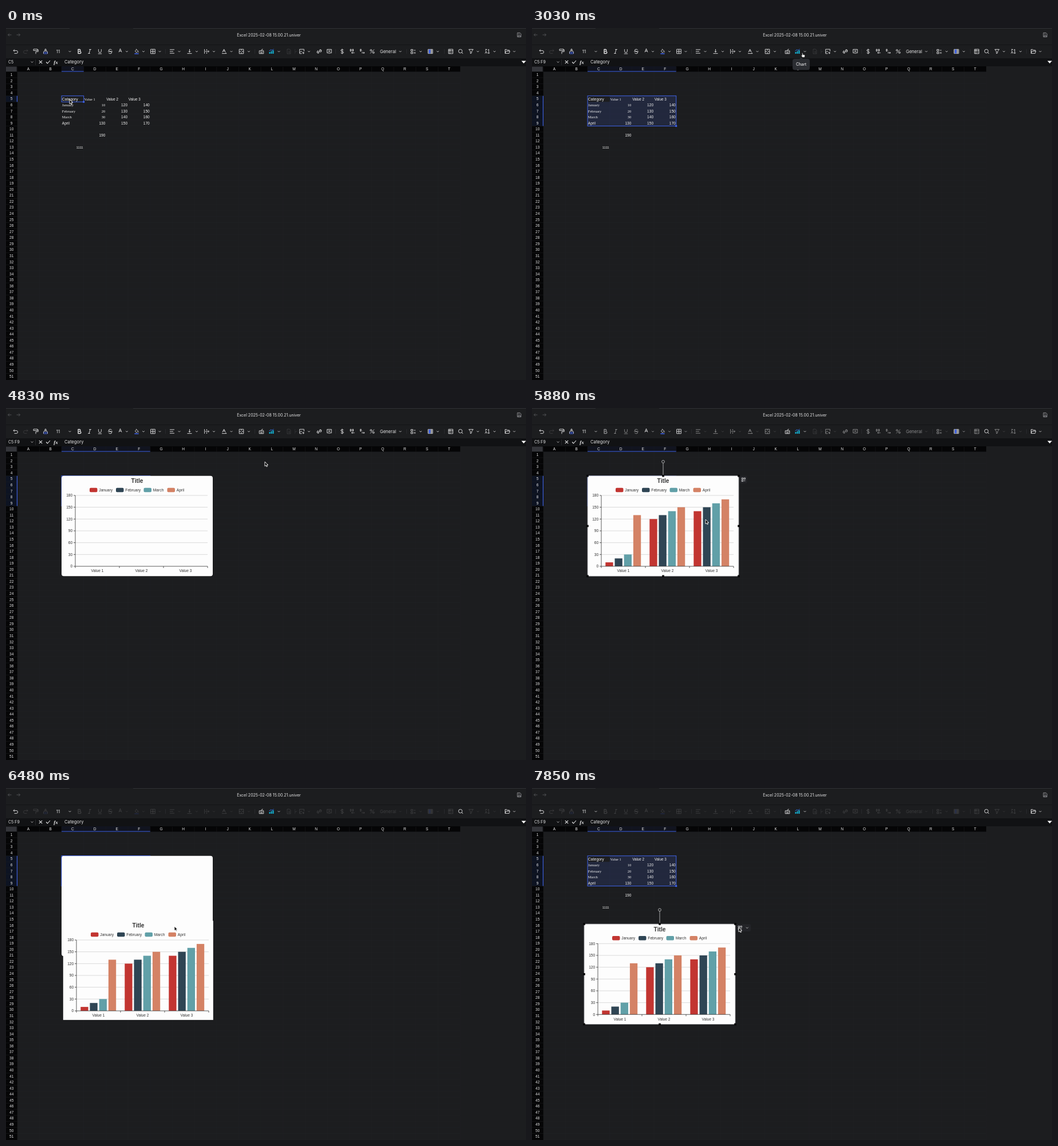
These frames come from a looping animation (908x616 px, 8000 ms). An HTML page with a canvas:

```html
<!DOCTYPE html>
<html lang="en">
<head>
<meta charset="utf-8">
<title>Spreadsheet chart</title>
<style>
  html, body { margin: 0; width: 100%; height: 100%; overflow: hidden; background: #1c1d1f; }
  canvas { display: block; width: 908px; height: 616px; }
</style>
</head>
<body>
<canvas id="stage" width="908" height="616"></canvas>
<script>
const c = document.getElementById('stage').getContext('2d');
const LOOP = 8000;
const UI = 'Inter, sans-serif', SANS = '"Liberation Sans", Arial, sans-serif', SERIF = '"Liberation Serif", Times, serif';
const WHITE = '#e6e6e7', BLUE = '#3f63e8', CYAN = '#12b5d8';

// Grid geometry
const COL_W = 38.67, ROW_H = 10.56, LEFT = 19.7, TOP = 76.5, COLS = 20, ROWS = 51;
const colX = n => LEFT + n * COL_W;
const rowY = n => TOP + n * ROW_H;

// Drawing helpers
function rect(x, y, w, h, fill) { c.fillStyle = fill; c.fillRect(x, y, w, h); }
function round(x, y, w, h, r, fill) {
  c.fillStyle = fill; c.beginPath(); c.roundRect(x, y, w, h, r); c.fill();
}
function line(x1, y1, x2, y2, color, width = 1) {
  c.strokeStyle = color; c.lineWidth = width;
  c.beginPath(); c.moveTo(x1, y1); c.lineTo(x2, y2); c.stroke();
}
// y is the middle of the capitals
function text(s, x, y, size, { font = UI, color = WHITE, align = 'left', style = '' } = {}) {
  c.font = `${style} ${size}px ${font}`;
  c.fillStyle = color; c.textAlign = align;
  c.fillText(s, x, y + size * .36);
}
function path(d, x, y, { stroke, fill, width = .9 } = {}) {
  const p = new Path2D(d);
  c.save(); c.translate(x, y);
  if (fill) { c.fillStyle = fill; c.fill(p); }
  if (stroke) { c.strokeStyle = stroke; c.lineWidth = width; c.lineJoin = 'round'; c.stroke(p); }
  c.restore();
}
const chevron = (x, y, color = '#c4c4c6') => path('M-1.9-.9 0 1 1.9-.9', x, y, { stroke: color, width: .9 });

// The latest entry whose time has come
const at = (keys, t) => keys.findLast(k => k[0] <= t);

// Timeline: [time, values...]
const CURSOR = [
  [0, 111, 125], [300, 168, 139], [450, 237, 156], [600, 192, 147], [780, 124, 131], [930, 104, 126],
  [1230, 160, 133], [1380, 217, 147], [1530, 231, 155], [1680, 237, 160], [1830, 239, 164], [1980, 240, 165],
  [2430, 262, 148], [2580, 330, 106], [2730, 404, 70], [2880, 456, 48], [3030, 471, 43], [3180, 472, 43], [3330, 472, 44],
  [3480, 472, 48], [3630, 472, 55], [3780, 471, 63], [3930, 471, 70], [4080, 472, 74], [4380, 472, 75],
  [4830, 452, 94], [4980, 398, 138], [5130, 340, 176], [5280, 303, 195],
  [6030, 292, 226], [6300, 292, 239], [6480, 294, 242], [6660, 288, 247], [6960, 292, 248], [7110, 308, 247],
  [7270, 331, 246], [7420, 346, 246], [7570, 357, 246], [7700, 361, 245], [7850, 361, 244]
];
// Selected columns, rows and the address shown
const SELECTION = [
  [0, 1, 1, 'C5'], [1230, 2, 1, 'C5:D5'], [1380, 2, 2, 'C5:D5'], [1530, 4, 3, 'C5:E7'],
  [1680, 4, 4, 'C5:F8'], [1830, 4, 5, 'C5:F9']
];
const GROWTH = [[4830, 0], [4980, .6], [5130, .9], [5280, 1]];
const DRAG = [[0, 0, 0], [6030, 0, 97.5], [6300, 0, 110], [6480, 2, 113], [6660, -4, 118], [6810, -6, 119.3]];
// Opacity of tools that switch off: ordinary, slow, ordinary arrow, slow arrow
const FADE = [[0, 1, 1, 1, 1], [5880, .55, 1, .2, .65], [6030, .25, .4, .16, .25], [6300, .16, .16, .12, .12]];

// Toolbar: x, outline, options
const TOOLS = [
  [17, 'M-4-1.5H1A2.4 2.4 0 0 1 1 3.5H-2.5M-2-3.6-4-1.5-2 .6', { on: 1 }],
  [34, 'M4-1.5H-1A2.4 2.4 0 0 0-1 3.5H2.5M2-3.6 4-1.5 2 .6', { off: 1 }],
  [52, 'M-4-4H3V-1.5H-4ZM3-3H4.2V.4H0V4.3', { slow: 1 }],
  [69, 'M-1-1V-4H1V-1M-3.4 4V.8Q-3.4-1 0-1 3.4-1 3.4.8V4', { slow: 1, blue: 'M-3.4 1.6H3.4M-3.4 4H3.4M0 2V4' }],
  [91, '', { on: 1, label: '11', size: 7.8, arrow: 111.5 }],
  [128, 'M-2-3.5H.6A1.7 1.7 0 0 1 .6-.2H-2ZM-2-.2H1A1.8 1.8 0 0 1 1 3.5H-2Z', { width: 1.3 }],
  [146, 'M-.8-3.5H2.8M-2.8 3.5H.8M1-3.5-1 3.5', {}],
  [164, 'M-2.4-3.8V-.4A2.4 2.4 0 0 0 2.4-.4V-3.8M-3.2 4H3.2', {}],
  [182, 'M2.7-2.5Q1.8-3.8 0-3.8-2.6-3.8-2.6-1.9-2.6-.6 0 0 2.7.6 2.7 2.1 2.7 3.8 0 3.8-2 3.8-2.8 2.4M-4 0H4', {}],
  [199.5, 'M-2.4 2.3 0-3.8 2.4 2.3M-1.6.4H1.6', { slow: 1, arrow: 211, y: 40 }],
  [228, 'M-2.8-.6 0-3.4 2.8-.6 0 2.2ZM0-3.4-1-4.3M3.2.4V1.7', { slow: 1, arrow: 240, blue: 'M-3.6 4H3.6', blueWidth: 1.6 }],
  [256.5, 'M-3.8-3.8H3.8V3.8H-3.8ZM0-3.8V3.8M-3.8 0H3.8', { slow: 1, arrow: 268.5 }],
  [290, 'M-4-3.2H4M-4 0H2M-4 3.2H4', { arrow: 302.5 }],
  [320.5, 'M0-4V1.4M-1.8-.4 0 1.4 1.8-.4M-4 3.6H4', { arrow: 333 }],
  [350.5, 'M-3.8-4V4M0-4V-1.6M0 1.6V4M-2.5 0H4M2.4-1.6 4 0 2.4 1.6', { arrow: 363 }],
  [381, 'M-3 1.4-.4-4 2.2 1.4M-2-.8H1.2M-4 3.6H4M2.6 2.2 4 3.6', { arrow: 393.5 }],
  [411, 'M-3.8-3.8H3.8V3.8H-3.8ZM-3.8 0H-.8M3.8 0H.8M0-3.8V-1.6M0 3.8V1.6', { arrow: 424 }],
  [446, 'M-3.8-1.2H3.8V3.8H-3.8ZM-2 .6H-1M0 .6H1M2 .6H2.6M-2 2.3H2M0-1.2V-2.4Q0-3.4 2-3.4V-4.4', { on: 1 }],
  [463.5, '', { on: 1, chart: 1, arrow: 476.5 }],
  [494, 'M-3-4H1L3-2V4H-3ZM-1 0H2M-1 2H2', { off: 1 }],
  [516.5, 'M3.8 0V-3.8H-3.8V3.8H0M-3.8 2-1-.6 1 1.4M1.2-1.8H1.4M2.8 1V4.4M1.1 2.7H4.5', { arrow: 529 }],
  [547, 'M-.5 1.9-1.6 3A1.9 1.9 0 0 1-3.6.4L-1.8-1.4M.5-1.9 1.6-3A1.9 1.9 0 0 1 3.6-.4L1.8 1.4M-1.5 1.5 1.5-1.5', { width: 1.1 }],
  [564.5, 'M-3.8-3.6H3.8V2.6H1.2L0 4-1.2 2.6H-3.8ZM-1.8-1.4H1.8M-1.8.6H1.8', {}],
  [587, 'M2.4-2Q1.8-3.2 0-3.2-2.4-3.2-2.4-1.6-2.4-.4 0 0 2.4.4 2.4 1.8 2.4 3.2 0 3.2-2 3.2-2.5 2M0-4.6V4.6', {}],
  [604.5, 'M-3.4-3.8H-1.8V-.4H-3.4ZM.4-3.8H2V-.4H.4ZM4 2.4H-1M.4 1-1 2.4.4 3.8', {}],
  [622, 'M-3.4-3.8H-1.8V-.4H-3.4ZM-1 2.4H4M2.6 1 4 2.4 2.6 3.8M.2-.4H.8', {}],
  [639.5, 'M3.4-3.4-3.4 3.4M-3.6-2A1.4 1.4 0 1 1-.8-2 1.4 1.4 0 1 1-3.6-2ZM.8 2A1.4 1.4 0 1 1 3.6 2 1.4 1.4 0 1 1 .8 2Z', {}],
  [667, '', { label: 'General', size: 7.6, arrow: 688.5 }],
  [711, 'M-4-3.4H-.6V-.8H-4ZM-4 1.2H-.6V3.8H-4ZM1.4-2H4M1.4 1.2 4 3.8M4 1.2 1.4 3.8', { arrow: 724 }],
  [741, 'M-4-3.6H4V3.6H-4ZM-4-1.2H4M-4 1.2H4M1.6-3.6V3.6', { slow: 1, arrow: 754, blue: 'M-1.2-3.4V3.4', blueWidth: 3 }],
  [776.5, 'M-3.8-3.8H3.8V3.8H-3.8ZM-1.4-3.8V3.8M-3.8-1.4H3.8M.8 1.2H2.6', {}],
  [794, 'M-3.8-.5A3.2 3.2 0 1 1 2.6-.5 3.2 3.2 0 1 1-3.8-.5ZM1.8 1.8 4 4', { on: 1 }],
  [812, 'M-3.8-3.6H3.8L1 .2V2.6L-1 3.8V.2Z', { arrow: 824 }],
  [840.5, 'M-3.8 3.6-2.2-.2-.6 3.6M-3.6-3.6H-1L-3.6-1M2.4-3.8V3.8M.8 2.2 2.4 3.8 4 2.2M.8-2.2 2.4-3.8', { arrow: 853 }],
  [875.5, 'M-4 3.4V-3.4H-1L0-2.2H3.4V-.6M-4 3.4-2.4-.6H4.4L3 3.4Z', { on: 1, arrow: 887.5 }]
];

function chartIcon(x, y, scale = 1) {
  c.save(); c.translate(x, y); c.scale(scale, scale);
  path('M-4 4V1H-2V4ZM-1 4V-.6H1V4ZM2 4V-2H4V4Z', 0, 0, { fill: CYAN });
  path('M-4-.8-1-3 1-2 4-4', 0, 0, { stroke: '#2f7bff' });
  c.restore();
}

function drawToolbar(t) {
  const [, plain, slow, plainArrow, slowArrow] = at(FADE, t);
  for (const [x, d, o] of TOOLS) {
    const y = o.y || 41;
    c.globalAlpha = o.off ? .14 : o.on ? 1 : o.slow ? slow : plain;
    if (o.chart) chartIcon(x, y);
    if (o.label) text(o.label, x, y, o.size, { align: 'center' });
    if (d) path(d, x, y, { stroke: WHITE, width: o.width });
    if (o.blue) path(o.blue, x, y, { stroke: BLUE, width: o.blueWidth });
    c.globalAlpha = o.on ? 1 : o.slow ? slowArrow : plainArrow;
    if (o.arrow) chevron(o.arrow, 41);
  }
  c.globalAlpha = .14;
  chevron(506, 41);
  c.globalAlpha = 1;
  for (const x of [278.5, 434.5, 504.5, 575.5, 699.5, 765.5, 863.5]) line(x, 37, x, 45, '#292a2d');
}

function drawFrame(t, address) {
  rect(0, 0, 908, 616, '#1c1d1f');
  rect(0, 0, 111, 1, '#303135');
  rect(222, 0, 686, 1, '#303135');
  path('M3 0H-3M-.6-2.4-3 0-.6 2.4', 6.5, 12, { stroke: '#56575b' });
  path('M-3 0H3M.6-2.4 3 0 .6 2.4', 21.5, 12, { stroke: '#56575b' });
  text('Excel 2025-02-08 15.00.21.univer', 459, 12, 7, { align: 'center' });
  path('M-3-3.6H1.4L3.2-1.8V3.6H-3ZM-1.4 3.4V.8H1.6V3.4M-1.2-1.6H.6', 896, 12, { stroke: '#a8a8ab', width: .8 });
  line(0, 29.5, 908, 29.5, '#141517');
  drawToolbar(t);

  rect(0, 53, 908, 14, '#111214');
  text(address, 4, 59.5, 7);
  chevron(45.5, 59.5);
  line(51.5, 55, 51.5, 65, '#27282b');
  path('M-2.7-2.7 2.7 2.7M2.7-2.7-2.7 2.7', 60.5, 59.5, { stroke: WHITE, width: 1.1 });
  path('M-3.4 0-1 2.5 3.4-2.5', 73.5, 59.5, { stroke: WHITE, width: 1.1 });
  text('fx', 87, 59.3, 9, { font: SERIF, style: 'italic bold', align: 'center' });
  text('Category', 102, 59.3, 7.7);
  path('M-4-2H4L0 2.5Z', 904, 59.5, { fill: '#fff' });
}

function drawSheet(cols, rows) {
  for (let i = 0; i <= COLS; i++) line(colX(i), TOP, colX(i), 616, '#202124', .7);
  for (let i = 0; i <= ROWS; i++) line(LEFT, rowY(i), colX(COLS), rowY(i), '#202124', .7);

  const x = colX(2), y = rowY(4), w = cols * COL_W, h = rows * ROW_H;
  rect(0, 67, colX(COLS), TOP - 67, '#050506');
  rect(0, TOP, LEFT, 616 - TOP, '#050506');
  rect(0, 67.5, LEFT - 1, 8.5, '#34353a');
  rect(x, 67, w, TOP - 67, '#11141f');
  rect(0, y, LEFT, h, '#0d1322');
  for (let i = 0; i < COLS; i++) {
    line(colX(i), 68, colX(i), TOP, '#1c1d1f', .6);
    text(String.fromCharCode(65 + i), colX(i + .5), 72, 6.6, { font: SANS, align: 'center' });
  }
  for (let i = 0; i < ROWS; i++) {
    line(0, rowY(i), LEFT, rowY(i), '#1c1d1f', .6);
    text(i + 1, 9.7, rowY(i + .5), 6.6, { font: SANS, align: 'center' });
  }
  line(x, 76, x + w, 76, BLUE, 1.1);
  line(19.4, y, 19.4, y + h, BLUE, 1.1);

  c.fillStyle = 'rgba(70,105,235,.15)';
  c.beginPath();
  c.rect(x, y, w, h);
  c.rect(x, y, COL_W, ROW_H);
  c.fill('evenodd');
  c.strokeStyle = BLUE; c.lineWidth = 1;
  c.strokeRect(x, y, w, h);
  rect(x + w - 1.5, y + h - 1.5, 3, 3, BLUE);
}

const MONTHS = ['January', 'February', 'March', 'April'];
const VALUES = [[10, 120, 140], [20, 130, 150], [30, 140, 160], [130, 150, 170]];
const COLORS = ['#c23531', '#2f4554', '#61a0a8', '#d48265'];

function cell(s, col, row, font = SANS, size = 6.6) {
  const number = typeof s === 'number';
  text(s, number ? colX(col + 1) - 1 : colX(col) + .8, rowY(row - .5) + .4, size,
    { font, align: number ? 'right' : 'left', color: '#f2f2f2' });
}
function drawCells() {
  cell('Category', 2, 5, SANS, 6.9);
  [1, 2, 3].forEach(n => cell('Value ' + n, n + 2, 5, n == 1 ? SERIF : SANS, 6.3));
  MONTHS.forEach((month, m) => {
    const serif = m < 3;
    cell(month, 2, m + 6, serif ? SERIF : SANS, 6.5);
    VALUES[m].forEach((v, i) => cell(v, i + 3, m + 6, serif && !i ? SERIF : SANS));
  });
  cell(190, 3, 11);
  cell(1111, 2, 13, SANS, 6);
}

// Chart contents, relative to the card's corner
function drawPlot(x, y, growth) {
  const ink = { font: SANS, color: '#333' };
  c.save(); c.translate(x, y);
  text('Title', 132, 8.7, 10.2, { ...ink, style: 'bold', align: 'center' });
  [49, 95, 143.5, 184.5].forEach((lx, i) => {
    round(lx, 20.8, 13.5, 7.4, 2, COLORS[i]);
    text(MONTHS[i], lx + 16.3, 24.6, 6.7, ink);
  });
  const base = 158, unit = 124 / 180, x0 = 24, group = 77;
  for (let v = 0; v <= 180; v += 30) {
    const gy = base - v * unit;
    if (v) line(x0, gy, x0 + 3 * group, gy, '#ccc', .7);
    line(x0 - 3, gy, x0, gy, '#333', .8);
    text(v, x0 - 4.8, gy, 6.6, { ...ink, align: 'right' });
  }
  for (let g = 0; g < 3; g++) {
    VALUES.forEach((row, m) => {
      const h = row[g] * unit * growth;
      rect(x0 + g * group + 7.3 + m * 16.2, base - h, 13.3, h, COLORS[m]);
    });
    text('Value ' + (g + 1), x0 + (g + .5) * group, 166, 6.6, { ...ink, align: 'center' });
  }
  line(x0, base, x0 + 3 * group, base, '#333', .8);
  line(x0, 34, x0, base, '#333', .8);
  for (let g = 0; g <= 3; g++) line(x0 + g * group, base, x0 + g * group, base + 3, '#333', .8);
  c.restore();
}

const CARD = { x: 97, y: 118.7, w: 264, h: 175.6 };
function drawHandles(x, y) {
  const { w, h } = CARD, mid = x + w / 2;
  c.strokeStyle = '#8f9094'; c.lineWidth = .8;
  c.strokeRect(x, y, w, h);
  line(mid, y, mid, y - 22.3, '#b9babc', .9);
  c.beginPath(); c.arc(mid, y - 24.8, 2.4, 0, 7); c.stroke();
  for (const i of [0, .5, 1]) for (const j of [0, .5, 1])
    if (i != .5 || j != .5) rect(x + i * w - 1.8, y + j * h - 1.8, 3.6, 3.6, '#050506');
}
function drawCardButton(x, y, open) {
  const bx = x + CARD.w + 2, by = y + .2;
  round(bx, by, open ? 25 : 12.5, 12.8, 2, '#232428');
  path('M-3-3H-.6V-.6H-3ZM.8-3H3.2V-.6H.8ZM-3 .8H-.6V3.2H-3ZM.8 2H3.2', bx + 6.2, by + 6.4, { stroke: WHITE, width: .8 });
  if (open) chevron(bx + 18.7, by + 6.4);
}
function drawChart(t) {
  if (t < 4830) return;
  const [, dx, dy] = at(DRAG, t), dragging = t >= 6030 && t < 6960;
  const x = CARD.x + dx, y = CARD.y + dy;
  if (dragging) {
    round(CARD.x, CARD.y, CARD.w, CARD.h, 4, '#fdfdfd');
    line(97, 118.6, 252, 118.6, BLUE, .8);
    line(97, 120, 97, 171.5, BLUE, .7);
    rect(x + .8, y + .6, CARD.w - 2, CARD.h - 2, '#fdfdfd');
  } else {
    round(x, y, CARD.w, CARD.h, 4, '#fdfdfd');
  }
  drawPlot(x, y + .3, at(GROWTH, t)[1]);
  if (t >= 5880 && !dragging) drawHandles(x, y);
  if (t >= 5280 && !dragging) drawCardButton(x, y, t >= 7700);
}

function drawMenu(t) {
  if (t >= 2980 && t < 3330) {
    round(455, 54, 30, 19.5, 4, '#2b2d32');
    path('M-3 0 0-3 3 0Z', 470, 54.2, { fill: '#2b2d32' });
    text('Chart', 470, 64, 6.9, { align: 'center', style: '500' });
  }
  if (t < 3330 || t >= 4830) return;
  round(457, 51, 104, 85, 4, '#272a30');
  round(461, 54, 97, 78, 3, '#2e3138');
  ['Bar/Column', 'Line/Area', 'Pie/Doughnut'].forEach((kind, i) =>
    text(`New ${kind} Chart`, 465, 62.3 + i * 24.3, 7.4));
  path('M-3 3V-1H-1.2V3ZM-.6 3V1H.8V3ZM1.4 3V-3H3V3Z', 472, 74.3, { fill: CYAN });
  path('M-3-3H2V-1.6H-3ZM-3-.7H3V.7H-3ZM-3 1.6H3V3H-3Z', 489.3, 74.3, { fill: CYAN });
  path('M-3 1-1-1 1 0 3-3', 472, 98.8, { stroke: '#2f7bff' });
  path('M-3 3H3M-3-1H-2M0 2H3', 472, 98.8, { stroke: CYAN, width: .7 });
  path('M-3 3V0L-1-2 1-.6 3-3V3Z', 489.3, 98.8, { fill: CYAN });
  path('M0 0V-3A3 3 0 1 0 3 0Z', 472, 123, { fill: CYAN });
  path('M.7-.7H3A3 3 0 0 0 .7-3Z', 472, 123, { fill: '#2f7bff' });
  path('M0-2.2A2.2 2.2 0 1 0 2.2 0', 489.3, 123, { stroke: CYAN, width: 1.8 });
  path('M0-2.2A2.2 2.2 0 0 1 2.2 0', 489.3, 123, { stroke: '#2f7bff', width: 1.8 });
}

function drawCursor(t) {
  const [, x, y] = at(CURSOR, t);
  if (t >= 2880 && t < 3480)
    path('M1.4 5.2V1Q2.2 0 3 1V3.4L6 4Q6.8 4.4 6.6 5.4L6 8.5H2.4L0 5.4Q.4 4.2 1.4 5.2Z', x - 1, y,
      { fill: '#fff', stroke: '#111', width: .7 });
  else
    path('M0 0V7.8L1.8 6.2 3 8.8 4.4 8.2 3.2 5.7H5.6Z', x, y, { stroke: '#fff', fill: '#050505', width: .9 });
}

function draw(now) {
  const t = now % LOOP;
  const [, cols, rows, address] = at(SELECTION, t);
  drawFrame(t, address);
  drawSheet(cols, rows);
  drawCells();
  drawChart(t);
  drawMenu(t);
  drawCursor(t);
  requestAnimationFrame(() => draw(performance.now()));
}
draw(0);
</script>
</body>
</html>
```
